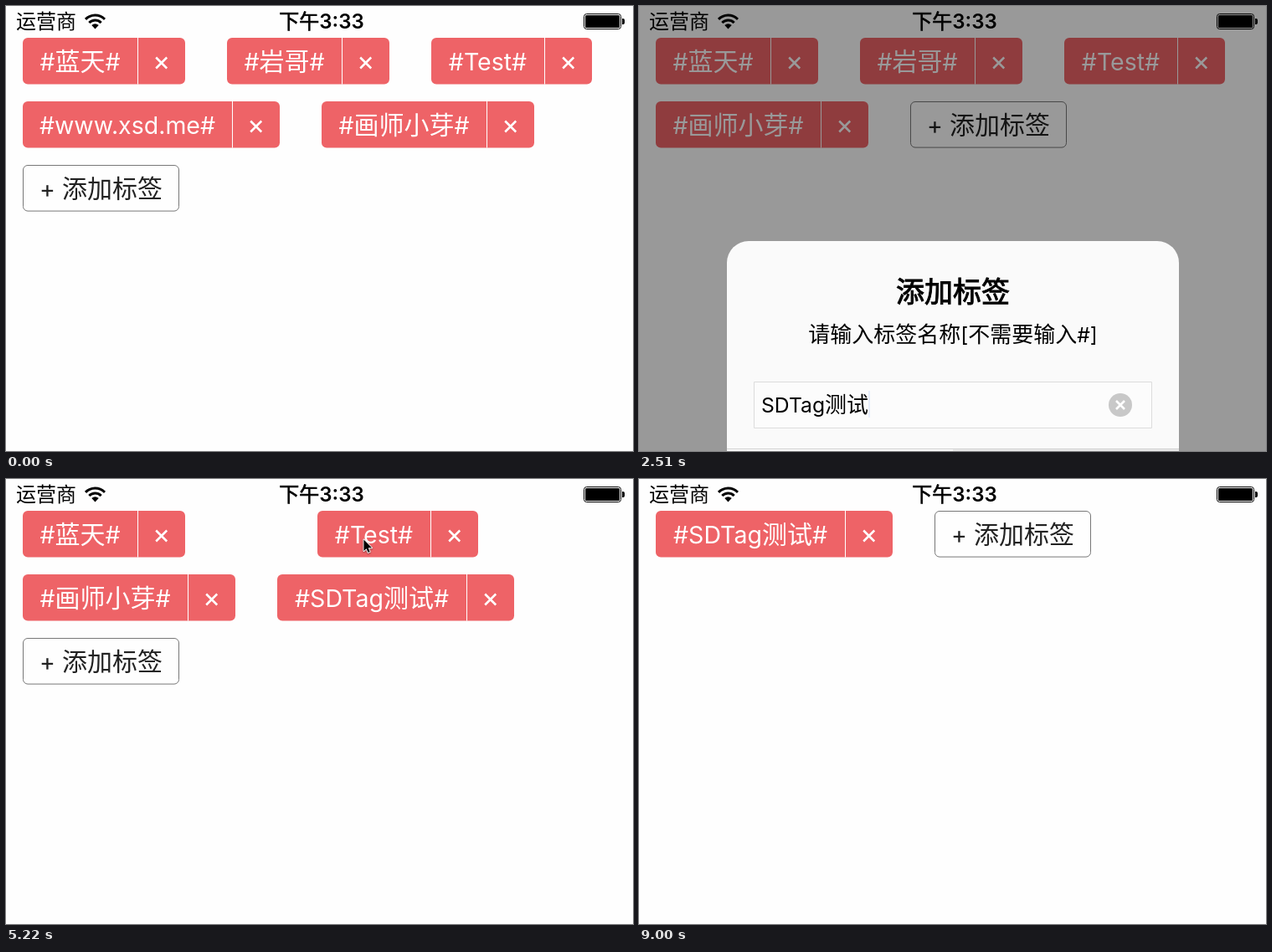
An HTML page with a canvas for the animation above (9.3 s loop, 749 by 532 pixels).

```html
<!DOCTYPE html>
<html lang="zh-CN">
<head>
<meta charset="utf-8">
<title>标签</title>
<style>
  html, body { margin: 0; width: 100%; height: 100%; overflow: hidden; background: #fefefe; }
  canvas { display: block; }
</style>
</head>
<body>
<canvas id="stage" width="749" height="532"></canvas>
<script>
const ctx = document.getElementById('stage').getContext('2d');
const LOOP = 9300, LAST_TICK = 43;
const RED = '#ee6367', HEIGHT = 55.6, ROW = 76, CLOSE_WIDTH = 56;

const tags = {
  sky: { text: '#蓝天#', width: 194 },
  bro: { text: '#岩哥#', width: 194 },
  test: { text: '#Test#', width: 192 },
  site: { text: '#www.xsd.me#', width: 307 },
  fan: { text: '#画师小芽#', width: 254 },
  fresh: { text: '#SDTag测试#', width: 283 },
  add: { text: '+ 添加标签', width: 187 }
};

const stages = [
  { at: -9, ids: ['sky', 'bro', 'test', 'site', 'fan', 'add'] },
  { at: 4.03, ids: ['sky', 'bro', 'test', 'fan', 'add'] },
  { at: 14.03, ids: ['sky', 'bro', 'test', 'fan', 'fresh', 'add'] },
  { at: 24.03, ids: ['sky', 'test', 'fan', 'fresh', 'add'] },
  { at: 29.03, ids: ['sky', 'test', 'fresh', 'add'] },
  { at: 33.03, ids: ['sky', 'fresh', 'add'] },
  { at: 39.03, ids: ['fresh', 'add'] }
];
stages.forEach(stage => { stage.places = layout(stage.ids); });

// Pointer paths as [tick, x, y]; the pointer is hidden outside them.
const pointerPaths = [
  [[1, 330, 222], [4, 299, 143], [5, 294, 152], [6, 286, 174], [7, 382, 148], [9, 382, 148]],
  [[14, 500, 490], [18, 244, 194], [19, 244, 194], [20, 350, 179], [24, 429, 66],
   [25, 427, 72], [28, 250, 142], [29, 245, 142], [30, 296, 127], [33, 427, 67],
   [36, 240, 153], [37, 207, 146], [39, 185, 68], [40, 260, 150], [42, 636, 510]]
];

const lerp = (a, b, p) => a + (b - a) * p;
const ease = p => {
  p = Math.max(0, Math.min(1, p));
  return p * p * (3 - 2 * p);
};

function layout(ids) {
  const places = {};
  let x = 20, y = 38;
  for (const id of ids) {
    const { width } = tags[id];
    if (x + width > 729) {
      x = 20;
      y += ROW;
    }
    places[id] = { x, y };
    x += width + 50;
  }
  return places;
}

// Latin runs are set slightly smaller than the Chinese ones beside them.
// Strong Chinese text is regular with a thin outline, for a medium weight.
function drawText(text, x, baseline, size, { color = '#000', strong = false, center = false, latin = 0.95 } = {}) {
  const runs = text.match(/[\u4e00-\u9fff]+|[^\u4e00-\u9fff]+/g).map(run => {
    const chinese = /[\u4e00-\u9fff]/.test(run);
    const font = chinese
      ? `400 ${size}px "Noto Sans CJK SC", "Noto Sans CJK", sans-serif`
      : `${strong ? 600 : 400} ${size * latin}px Inter, sans-serif`;
    ctx.font = font;
    return { run, font, outlined: strong && chinese, width: ctx.measureText(run).width };
  });
  const total = runs.reduce((sum, part) => sum + part.width, 0);
  if (center) x -= total / 2;
  ctx.fillStyle = ctx.strokeStyle = color;
  ctx.lineWidth = size / 36;
  for (const part of runs) {
    ctx.font = part.font;
    ctx.fillText(part.run, x, baseline);
    if (part.outlined) ctx.strokeText(part.run, x, baseline);
    x += part.width;
  }
  return x;
}

function box(x, y, w, h, r, fill, stroke) {
  ctx.beginPath();
  ctx.roundRect(x, y, w, h, r);
  if (fill) {
    ctx.fillStyle = fill;
    ctx.fill();
  }
  if (stroke) {
    ctx.lineWidth = 1;
    ctx.strokeStyle = stroke;
    ctx.stroke();
  }
}

function rect(x, y, w, h, color) {
  ctx.fillStyle = color;
  ctx.fillRect(x, y, w, h);
}

function cross(x, y, r, width) {
  ctx.beginPath();
  ctx.moveTo(x - r, y - r);
  ctx.lineTo(x + r, y + r);
  ctx.moveTo(x + r, y - r);
  ctx.lineTo(x - r, y + r);
  ctx.lineWidth = width;
  ctx.strokeStyle = '#fff';
  ctx.stroke();
}

function drawStatusBar() {
  drawText('运营商', 12, 27, 24);
  ctx.strokeStyle = ctx.fillStyle = '#000';
  ctx.lineWidth = 3;
  for (const r of [10, 16]) {
    ctx.beginPath();
    ctx.arc(106.5, 27, r, -Math.PI * 0.755, -Math.PI * 0.245);
    ctx.stroke();
  }
  ctx.beginPath();
  ctx.moveTo(106.5, 27.5);
  ctx.arc(106.5, 27, 5.8, -Math.PI * 0.755, -Math.PI * 0.245);
  ctx.fill();

  drawText('下午3:33', 377, 27, 24, { strong: true, center: true, latin: 1 });

  box(690.5, 9.5, 44, 18, 3, '#fefefe', '#000');
  box(692, 11, 41, 15, 1.5, '#000');
  box(736, 15, 3, 7, [0, 2, 2, 0], '#000');
}

function drawTag(id, x, y) {
  const { text, width } = tags[id];
  if (id === 'add') {
    box(x + 0.5, y + 0.5, width - 1, HEIGHT - 1, 5.5, null, '#777');
    drawText(text, x + width / 2, y + 39, 30, { color: '#222', center: true });
    return;
  }
  const labelWidth = width - CLOSE_WIDTH - 1;
  box(x, y, width, HEIGHT, 6, RED);
  rect(x + labelWidth, y, 1, HEIGHT, '#fff');
  drawText(text, x + labelWidth / 2, y + 39, 30, { color: '#fff', center: true });
  cross(x + width - CLOSE_WIDTH / 2 - 0.3, y + 30, 6.5, 2.5);
}

function drawTags(tick) {
  const index = stages.findLastIndex(stage => stage.at <= tick);
  const { at, ids, places } = stages[index];
  const before = stages[Math.max(0, index - 1)].places;
  const p = ease((tick - at) / 1.8);
  for (const id of ids) {
    const to = places[id], from = before[id] || to;
    drawTag(id, Math.round(lerp(from.x, to.x, p)), Math.round(lerp(from.y, to.y, p)));
  }
}

function drawDialog(tick) {
  const shown = ease((tick - 8.4) / 1.2);
  const alpha = shown * (1 - ease((tick - 12.4) / 1.5));
  if (!alpha) return;

  rect(0, 0, 749, 532, `rgba(0, 0, 0, ${0.4 * alpha})`);
  ctx.save();
  ctx.globalAlpha = alpha;
  const scale = lerp(1.2, 1, shown);
  ctx.translate(375, 450);
  ctx.scale(scale, scale);
  ctx.translate(-375, -450);

  box(105, 281, 540, 338, 26, '#fafafa');
  drawText('添加标签', 375, 354, 34, { strong: true, center: true });
  drawText('请输入标签名称[不需要输入#]', 375, 402, 26, { center: true });
  box(137.5, 449.5, 475, 55, 0, '#fcfcfc', '#dcdcdc');

  const typed = tick < 11 ? '' : tick < 12 ? 'SDTag' : 'SDTag测试';
  const end = typed ? drawText(typed, 146, 486, 26) : 146;
  rect(end, 460, 2, 32, tick < 12 ? '#5b7df0' : '#e6edfb');
  if (typed) {
    box(561, 463, 28, 28, 14, '#c8c8c8');
    cross(575, 477, 5, 2.6);
  }
  if (tick >= 12) rect(375, 530, 270, 60, '#e9e9e9');
  rect(105, 529, 540, 1, '#d2d2d2');
  ctx.restore();
}

function drawPointer(tick) {
  const path = pointerPaths.find(p => tick >= p[0][0] && tick <= p[p.length - 1][0]);
  if (!path) return;
  const i = path.findLastIndex(point => point[0] <= tick);
  const [start, x0, y0] = path[i];
  const [end, x1, y1] = path[i + 1] || [start + 1, x0, y0];
  const p = (tick - start) / (end - start);

  ctx.save();
  ctx.translate(lerp(x0, x1, p), lerp(y0, y1, p));
  ctx.scale(0.88, 0.88);
  const arrow = new Path2D('M.5 .5V16L4 12.7 6.3 18 8.8 17 6.5 11.7H11.4Z');
  ctx.lineJoin = 'round';
  ctx.lineWidth = 2;
  ctx.strokeStyle = '#fff';
  ctx.shadowColor = 'rgba(0, 0, 0, .4)';
  ctx.shadowBlur = 2;
  ctx.shadowOffsetY = 1;
  ctx.stroke(arrow);
  ctx.shadowColor = 'transparent';
  ctx.fillStyle = '#000';
  ctx.fill(arrow);
  ctx.restore();
}

function draw() {
  const time = performance.now() % LOOP;
  const tick = Math.min(LAST_TICK, Math.floor((time + 15) * LAST_TICK / 9000));
  rect(0, 0, 749, 532, '#fefefe');
  drawStatusBar();
  drawTags(tick);
  drawDialog(tick);
  drawPointer(tick);
  requestAnimationFrame(draw);
}
draw();
</script>
</body>
</html>
```
